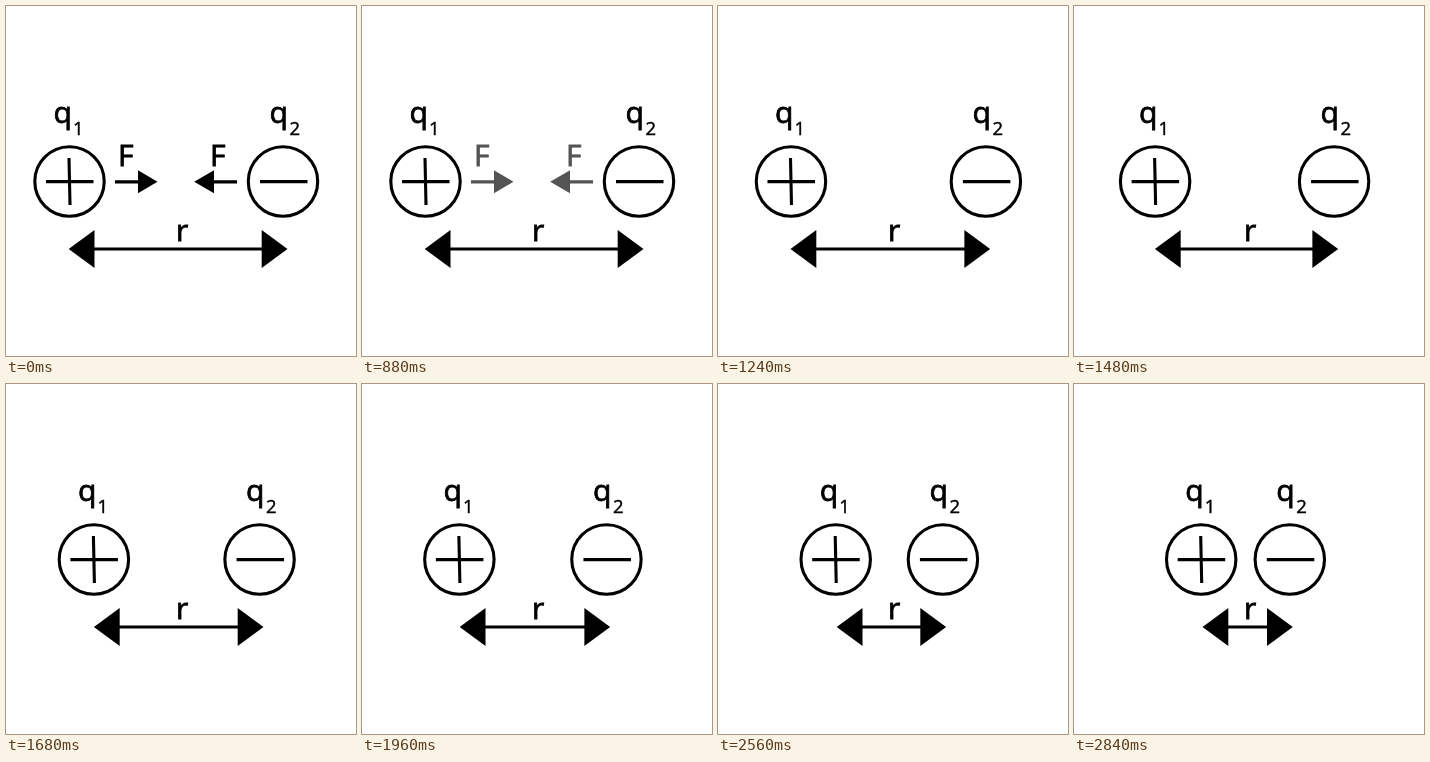
Recreate the animation shown at these times as an HTML page. Size 350 by 350 pixels, loop 2.88 s.

```html
<!DOCTYPE html>
<html lang="en">
<head>
<meta charset="utf-8">
<style>
  html, body { margin: 0; width: 100%; height: 100%; overflow: hidden; background: #fff; }
  svg { display: block; width: 100vw; height: 100vh; }
  text { font: 30px "Open Sans", "Noto Sans", sans-serif; stroke: #000; stroke-width: .8; }
  .sub { font-size: 18.5px; stroke-width: .4; }
  .ring, .sign { fill: none; stroke: #000; stroke-width: 3.1; }
</style>
</head>
<body>
<svg viewBox="0 0 350 350">
  <g id="forces">
    <text x="112" y="160">F</text>
    <text x="204" y="160">F</text>
    <path d="M109 174.2H132V164.2L151.5 175.7L132 187.2V177.4H109Z"/>
    <path d="M231 174.2H208V164.2L188.2 175.7L208 187.2V177.4H231Z"/>
  </g>
  <text x="170" y="234.5">r</text>
  <path id="shaft" stroke="#000" stroke-width="3.2"/>
  <g id="left">
    <text x="47.5" y="116.7">q</text>
    <text class="sub" x="67" y="128.6">1</text>
    <circle class="ring" cx="63.5" cy="175.5" r="34.7"/>
    <path class="sign" d="M40 175.6H87.5M63 152L64 199"/>
  </g>
  <g id="right">
    <text x="263.5" y="116.7">q</text>
    <text class="sub" x="283.5" y="128.6">2</text>
    <circle class="ring" cx="277" cy="175.5" r="34.7"/>
    <path class="sign" d="M254 175.6H301.5"/>
  </g>
  <path id="leftHead" d="M62.7 243L88.5 224V262Z"/>
  <path id="rightHead" d="M281.5 243L255.7 224V262Z"/>
</svg>
<script>
  const LOOP = 2880, STEP = 40, FADE_START = 840, MOVE_START = 960, MOVE_TIME = 1880;
  const [forces, shaft, left, right, leftHead, rightHead] =
    ["forces", "shaft", "left", "right", "leftHead", "rightHead"].map(id => document.getElementById(id));
  const clamp = v => Math.min(1, Math.max(0, v));
  const shift = (el, dx) => el.setAttribute("transform", `translate(${dx})`);

  function draw(now) {
    const t = Math.floor(now % LOOP / STEP) * STEP;
    const fade = clamp((t - FADE_START) / (MOVE_START - FADE_START));
    const travel = clamp((t - MOVE_START) / MOVE_TIME);
    const dl = 65.8 * travel, dr = -62.7 * travel;
    forces.setAttribute("opacity", 1 - fade);
    shift(left, 63.7 * travel);
    shift(right, -61.2 * travel);
    shift(leftHead, dl);
    shift(rightHead, dr);
    shaft.setAttribute("d", `M${86 + dl} 243H${258 + dr}`);
    requestAnimationFrame(draw);
  }
  draw(performance.now());
</script>
</body>
</html>
```
